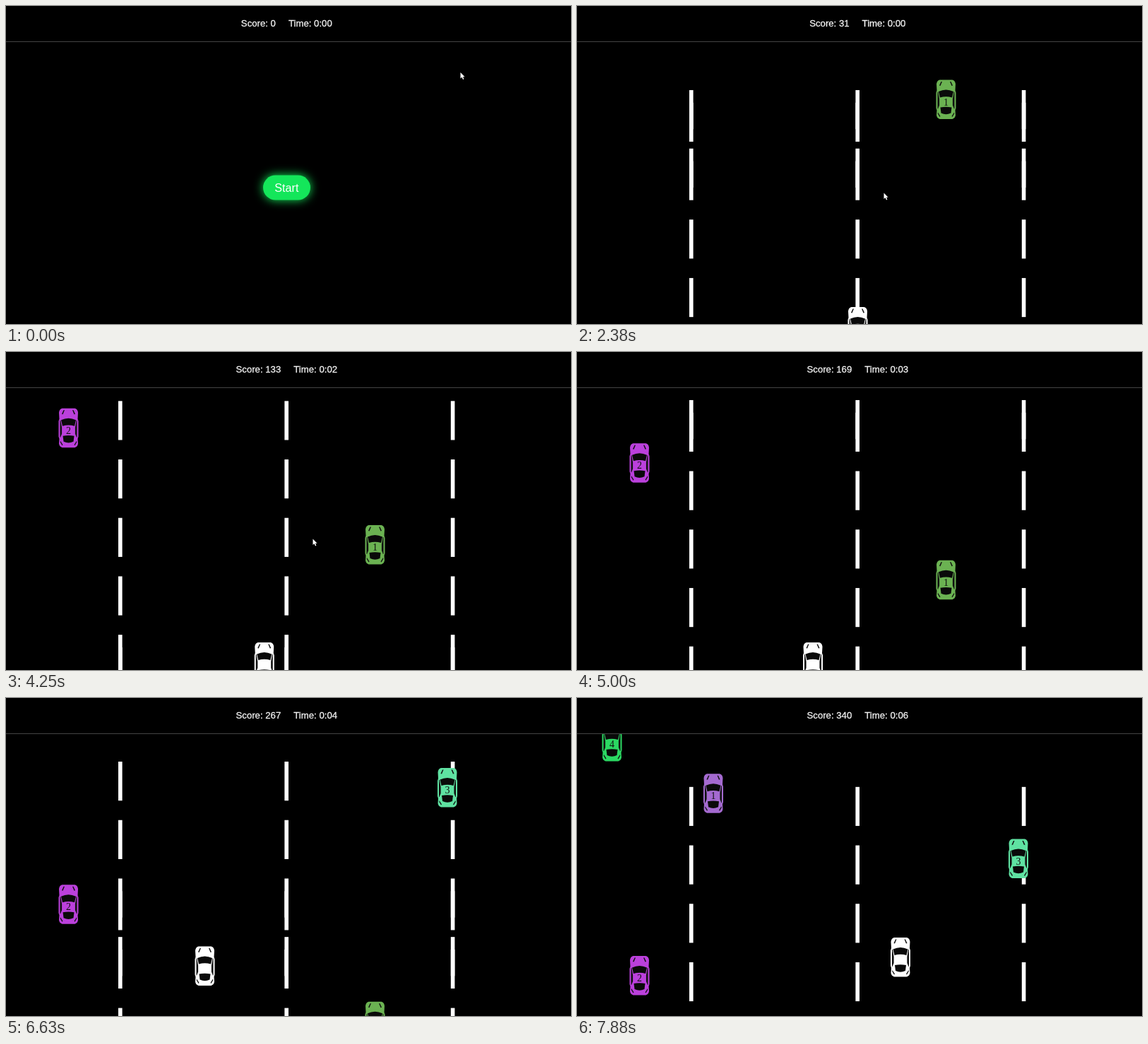
An HTML page with a canvas that plays this animation: 800x450 px, repeating every 8 s.

```html
<!DOCTYPE html>
<html lang="en">
<head>
<meta charset="utf-8">
<title>Lane dodge</title>
<style>
html, body { margin: 0; width: 100%; height: 100%; overflow: hidden; background: #000; }
canvas { display: block; }
</style>
</head>
<body>
<canvas id="stage" width="800" height="450"></canvas>
<script>
const ctx = document.getElementById('stage').getContext('2d');
const SANS = '"Liberation Sans", Arial, sans-serif';
const SERIF = '"Liberation Serif", "Times New Roman", serif';
const LOOP = 8000, STEP = 125, START = 1700;
const UNIT = 1.378;          // pixels a car moves per score point
const ROAD_TOP = 51;

// Keys: [time, value, value...]
const scoreKeys = [[START, 0], [2375, 31], [3500, 97], [5000, 169], [6000, 227], [6625, 267], [7875, 340]];
const playerKeys = [[2375, 383.5, 426], [3500, 383.5, 411], [5000, 320, 411], [6000, 301, 396],
  [6625, 267.5, 351.5], [7875, 444, 339]];
const cursorKeys = [[250, 643, 93.5], [500, 560, 150], [750, 450, 245], [950, 434, 264],
  [4450, 434, 264], [4900, 805, 262]];

const rivals = [
  { x: 508.5, color: '#6bb252', next: { x: 179, color: '#a46ad0' } },
  { x: 74.5, color: '#bb40dc' },
  { x: 611, color: '#5fe2a2' },
  { x: 35.5, color: '#2bd862' }
];

function sample(keys, t) {
  if (t <= keys[0][0]) return keys[0].slice(1);
  for (let i = 1; i < keys.length; i++) {
    const a = keys[i - 1], b = keys[i];
    if (t <= b[0]) {
      const p = (t - a[0]) / (b[0] - a[0]);
      return a.slice(1).map((v, j) => v + (b[j + 1] - v) * p);
    }
  }
  return keys[keys.length - 1].slice(1);
}

function text(str, x, y, font, color, align = 'center') {
  ctx.font = font;
  ctx.fillStyle = color;
  ctx.textAlign = align;
  ctx.fillText(str, x, y);
}

function shape(path, color) {
  ctx.fillStyle = color;
  ctx.fill(new Path2D(path));
}

const BODY = 'M5 0H23Q27 1 27.5 6L27 15L28 18V40L27 43L27.5 50Q27 54 23 55.5H5Q1 54 .5 50L1 43L0 40V18L1 15L.5 6Q1 1 5 0Z';
const WINDSHIELD = 'M3.5 16.5Q14 11.5 24.5 16.5L22.5 25Q14 22.5 5.5 25Z';
const REAR_WINDOW = 'M6 39Q14 37.5 22 39L21 47Q14 50.5 7 47Z';
// Left-hand details, mirrored for the right
const TRIM = 'M4.5 8L7 2.5L8.5 2.5L6 8.5ZM2 17H2.8L4.6 27V36L2.6 41H2ZM2.5 46L6 51.5L5 52.5L2.3 48Z';

function car(x, y, color, label) {
  ctx.save();
  ctx.translate(x, y);
  shape(BODY, color);
  shape(WINDSHIELD, '#0a0a0a');
  shape(REAR_WINDOW, '#0a0a0a');
  shape(TRIM, '#111');
  ctx.save();
  ctx.translate(28, 0);
  ctx.scale(-1, 1);
  shape(TRIM, '#111');
  ctx.restore();
  if (label) text(label, 14, 36, '14px ' + SERIF, '#111');
  ctx.restore();
}

function laneMarks(score) {
  ctx.fillStyle = '#fff';
  for (let i = 0; i < 8; i++) {
    let y = 51.4 + 82.7 * i + 2 * UNIT * score;
    while (y >= 569) y -= 514;
    for (const x of [159, 394.4, 629.8]) ctx.fillRect(x, y, 5.6, 55.2);
  }
}

function road(t, score) {
  ctx.save();
  ctx.beginPath();
  ctx.rect(0, ROAD_TOP, 800, 450 - ROAD_TOP);
  ctx.clip();
  laneMarks(score);
  car(...sample(playerKeys, t), '#fff');
  rivals.forEach((r, i) => {
    const y = 61.8 - 165.4 * i + UNIT * score;
    const wrapped = y >= 475;
    const { x, color } = wrapped && r.next || r;
    car(x, wrapped ? y - 423 : y, color, i + 1);
  });
  ctx.restore();
}

function header(score, seconds) {
  ctx.fillStyle = '#444';
  ctx.fillRect(0, 50, 800, 1);
  const font = '13.2px ' + SANS, gap = 18;
  const left = 'Score: ' + score, right = 'Time: 0:0' + seconds;
  ctx.font = font;
  const w = ctx.measureText(left).width;
  const x = 397.3 - (w + gap + ctx.measureText(right).width) / 2;
  ctx.lineWidth = 0.3;
  ctx.strokeStyle = '#f4f4f4';
  for (const [str, tx] of [[left, x], [right, x + w + gap]]) {
    text(str, tx, 29.3, font, '#f4f4f4', 'left');
    ctx.strokeText(str, tx, 29.3);
  }
}

function startButton() {
  ctx.save();
  ctx.shadowColor = '#14e65a';
  ctx.shadowBlur = 14;
  ctx.fillStyle = '#14e65a';
  ctx.beginPath();
  ctx.roundRect(364, 239.5, 67, 35, 17.5);
  ctx.fill();
  ctx.restore();
  text('Start', 397.4, 262.8, '16.2px ' + SANS, '#fff');
}

function cursor(x, y) {
  ctx.save();
  ctx.translate(x, y);
  const arrow = new Path2D('M.5 .5V9L2.5 7.2L4 10.6L5.4 10L4 6.8H6.6Z');
  ctx.lineWidth = 1;
  ctx.strokeStyle = '#000';
  ctx.stroke(arrow);
  ctx.fillStyle = '#fff';
  ctx.fill(arrow);
  ctx.restore();
}

function draw(now) {
  const t = Math.floor(now % LOOP / STEP) * STEP;
  const score = Math.round(sample(scoreKeys, t)[0]);
  ctx.fillStyle = '#000';
  ctx.fillRect(0, 0, 800, 450);
  if (t < START) startButton();
  else road(t, score);
  header(score, Math.max(0, Math.floor((t - START) / 1000)));
  cursor(...sample(cursorKeys, t));
  requestAnimationFrame(draw);
}
requestAnimationFrame(draw);
</script>
</body>
</html>
```
